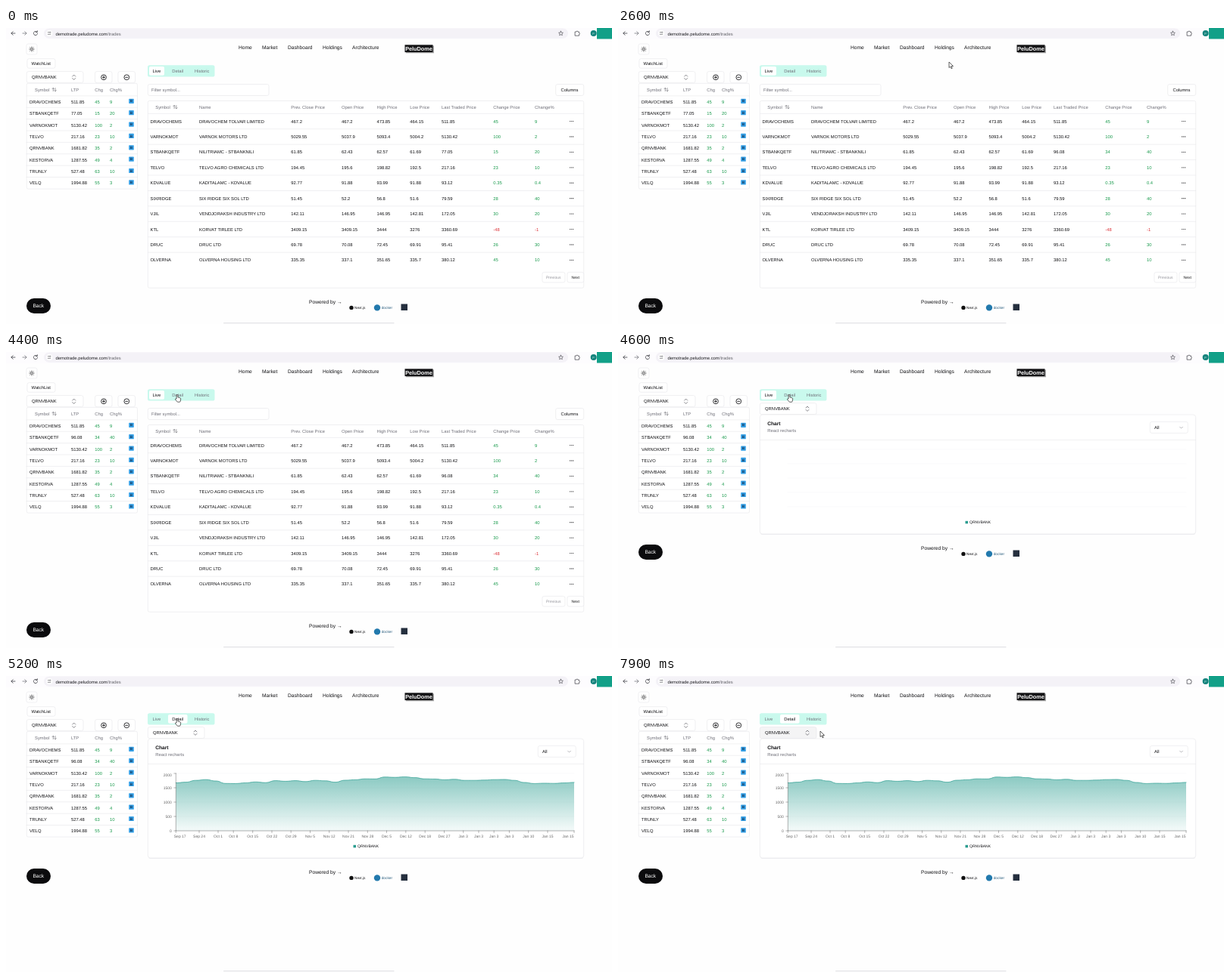
An HTML page that plays this animation: 800 px wide and 392 px high, repeating every 8 s.

```html
<!DOCTYPE html>
<html lang="en">
<head>
<meta charset="utf-8">
<title>Trades</title>
<style>
  html, body { margin: 0; width: 100%; height: 100%; overflow: hidden; background: #fefefe; }
  svg { display: block; width: 800px; height: 392px; }
  text { font-family: "Liberation Sans", Arial, sans-serif; text-rendering: geometricPrecision; white-space: pre; }
</style>
</head>
<body>
<script>
const INK = '#111114', GREY = '#6f6f78', LINE = '#e6e6ea', GREEN = '#16994a', RED = '#dc2f35', TEAL = '#2a9d90';
const SM = 5, MD = 5.83, LG = 6.67;

// cy is the middle of the capitals
const text = (x, cy, s, size = MD, fill = INK, more = '') =>
  `<text x="${x}" y="${(cy + size * 0.358).toFixed(2)}" font-size="${size}" fill="${fill}" ${more}>${s}</text>`;
const box = (x, y, w, h, r = 2.4, fill = '#fff', stroke = LINE, more = '') =>
  `<rect x="${x}" y="${y}" width="${w}" height="${h}" rx="${r}" fill="${fill}" stroke="${stroke}" stroke-width=".6" ${more}/>`;
const path = (d, stroke = INK, w = 0.7, more = '') =>
  `<path d="${d}" fill="none" stroke="${stroke}" stroke-width="${w}" stroke-linecap="round" stroke-linejoin="round" ${more}/>`;
const disc = (x, y, r, fill, more = '') => `<circle cx="${x}" cy="${y}" r="${r}" fill="${fill}" ${more}/>`;
const rule = (x1, x2, y, color = LINE) => path(`M${x1} ${y}H${x2}`, color, 0.6);
const group = (id, body, more = '') => `<g id="${id}" ${more}>${body}</g>`;
const chevrons = (x, y) => path(`M${x - 2} ${y - 1.2}l2-2 2 2M${x - 2} ${y + 1.2}l2 2 2-2`, '#55555c');
const sorter = (x, y) => path(`M${x - 1.2} ${y + 2}v-4.2m-1.2 1.2l1.2-1.2 1.2 1.2M${x + 1.6} ${y - 2}v4.2m-1.2-1.2l1.2 1.2 1.2-1.2`, '#55555c', 0.55);
const tone = s => s.startsWith('-') ? RED : GREEN;

function browserBar() {
  return `<rect width="800" height="15" fill="#fdfcfe"/>` +
    box(50, 0.5, 692, 13.3, 6.6, '#f4f2f7', 'none') +
    path('M12 7H7m2.2-2.3L6.9 7l2.3 2.3', '#3c3c42', 0.8) +
    path('M22 7h5m-2.2-2.3L27.100 7l-2.3 2.3', '#77777e', 0.8) +
    path('M41 5.300a2.6 2.6 0 1 0 .6 2.200M41.300 3.700v1.9h-1.900', '#3c3c42', 0.8) +
    disc(57.3, 7, 4, '#fff') +
    path('M55.300 5.700h1.800M58.800 8.300h-3.500', '#44444a', 0.6) +
    disc(58.3, 5.7, 0.7, 'none', 'stroke="#44444a" stroke-width=".5"') +
    text(65.5, 7.4, 'demotrade.peludome.com<tspan fill="#66666c">/trades</tspan>', 5.88, '#1d1d21') +
    path('M732.500 4.200l.9 1.900 2 .2-1.500 1.400.4 2-1.800-1-1.800 1 .4-2-1.500-1.400 2-.2z', '#3c3c42', 0.6) +
    path('M751.500 5h1.600a.9.9 0 0 1 1.800 0h1.600v1.700a.9.9 0 0 1 0 1.800v1.700h-5z', '#3c3c42', 0.7) +
    disc(775.7, 7, 4, '#15837c') + text(775.7, 7.1, 'P', 4, '#d8efed', 'text-anchor="middle"') +
    '<rect x="780" width="20" height="14.500" fill="#12a088"/>';
}

function header() {
  const links = [[307, 'Home'], [338, 'Market'], [372, 'Dashboard'], [418, 'Holdings'], [457, 'Architecture']];
  const rays = [0, 45, 90, 135, 180, 225, 270, 315]
    .map(a => path('M0-2.400v-.8', INK, 0.6, `transform="translate(34 28) rotate(${a})"`)).join('');
  return links.map(([x, s]) => text(x, 25.6, s, LG)).join('') +
    '<rect x="528" y="23.500" width="37" height="9.800" fill="#aaa"/><rect x="526.500" y="22.300" width="37" height="9.800" fill="#141416"/>' +
    text(545, 27.3, 'PeluDome', 7.3, '#fff', 'font-weight="700" text-anchor="middle"') +
    box(27, 21, 14, 14) + disc(34, 28, 1.4, 'none', `stroke="${INK}" stroke-width=".6"`) + rays;
}

function watchlist() {
  const rows = [
    ['DRAVOCHEMS', '511.85', '45', '9'], ['STBANKQETF', '77.05', '15', '20'],
    ['VARNOKMOT', '5130.42', '100', '2'], ['TELVO', '217.16', '23', '10'],
    ['QRNVBANK', '1681.82', '35', '2'], ['KESTORVA', '1287.55', '49', '4'],
    ['TRUNLY', '527.48', '63', '10'], ['VELQ', '1994.88', '55', '3']];
  const sign = x => disc(x, 65.3, 3.4, 'none', `stroke="${INK}" stroke-width=".85"`) + path(`M${x - 1.6} 65.300h3.200`, INK, 0.85);
  const cells = ([name, ltp, chg, pct], i) => {
    const y = 97.7 + i * 15.37;
    return (i ? rule(27, 173.5, y - 7.8) : '') + text(31, y, name) +
      text(86, y, ltp, MD, INK, 'class="w' + i + '"') +
      text(117.3, y, chg, MD, GREEN, 'class="w' + i + '"') +
      text(137, y, pct, MD, GREEN, 'class="w' + i + '"') +
      box(162.2, y - 4, 6.6, 6.2, 0.6, '#36a0e6', 'none') +
      text(165.5, y - 0.9, 'B', 4.7, '#12385c', 'text-anchor="middle" font-weight="700"');
  };
  return box(28, 40.7, 37, 12.5) + text(33.6, 47, 'WatchList') +
    box(27.3, 57.6, 74.7, 15) + text(34, 65.3, 'QRNVBANK') + chevrons(89.7, 65.3) +
    box(117.5, 57.6, 22.5, 15) + box(148, 57.6, 22.5, 15) + sign(129) + path('M129 63.700v3.200', INK, 0.85) + sign(159.3) +
    box(27.3, 73.3, 146.2, 139.8, 2) +
    text(38, 81.6, 'Symbol', MD, GREY) + sorter(63.5, 81.6) + text(86, 81.6, 'LTP', MD, GREY) +
    text(117.3, 81.6, 'Chg', MD, GREY) + text(137, 81.6, 'Chg%', MD, GREY) +
    rule(27, 173.5, 89.9) + rows.map(cells).join('');
}

function tabs() {
  return box(187, 49.2, 88.5, 15.4, 2.6, '#c9f9ed', 'none') +
    '<rect id="pill" y="51" height="11.800" rx="1.800" fill="#fff"/>' +
    text(193.5, 57, 'Live', MD, INK, 'id="tabLive"') + text(219.3, 57, 'Detail', MD, GREY, 'id="tabDetail"') +
    text(249, 57, 'Historic', MD, GREY);
}

function livePage() {
  const cols = [190.5, 255, 376.3, 443, 489.5, 533.3, 575, 643.3, 698];
  const heads = ['', 'Name', 'Prev. Close Price', 'Open Price', 'High Price', 'Low Price', 'Last Traded Price', 'Change Price', 'Change%'];
  const rows = [
    'DRAVOCHEMS|DRAVOCHEM TOLVAR LIMITED|467.2|467.2|473.85|464.15|511.85|45|9',
    'VARNOKMOT|VARNOK MOTORS LTD|5029.55|5037.9|5093.4|5004.2|5130.42|100|2',
    'STBANKQETF|NILITRIAMC - STBANKNILI|61.85|62.43|62.57|61.69|77.05|15|20',
    'TELVO|TELVO AGRO CHEMICALS LTD|194.45|195.6|198.82|192.5|217.16|23|10',
    'KDVALUE|KADITALAMC - KDVALUE|92.77|91.88|93.99|91.88|93.12|0.35|0.4',
    'SIXRIDGE|SIX RIDGE SIX SOL LTD|51.45|52.2|56.8|51.6|79.59|28|40',
    'VJIL|VENDJORAKSH INDUSTRY LTD|142.11|146.95|146.95|142.81|172.05|30|20',
    'KTL|KORVAT TIRLEE LTD|3409.15|3409.15|3444|3276|3360.69|-48|-1',
    'DRUC|DRUC LTD|69.78|70.08|72.45|69.91|95.41|26|30',
    'OLVERNA|OLVERNA HOUSING LTD|335.35|337.1|351.65|335.7|380.12|45|10'];
  const cells = (row, i) => {
    const y = 123.5 + i * 20.43;
    return (i ? rule(187.5, 762.7, y - 10.2) : '') +
      row.split('|').map((s, c) => text(cols[c], y, s, MD, c > 6 ? tone(s) : INK, c > 5 ? `class="l${i}"` : '')).join('') +
      [744.7, 746.7, 748.7].map(x => disc(x, y, 0.6, INK)).join('');
  };
  return box(187.3, 74.5, 159.7, 15) + text(192, 82, 'Filter symbol...', MD, GREY) +
    box(725.7, 74.5, 37, 15) + text(732.5, 82, 'Columns') +
    box(187.3, 96.5, 575.4, 247.7, 2) +
    text(197.3, 104.6, 'Symbol', MD, GREY) + sorter(223.3, 104.6) +
    heads.map((s, c) => text(cols[c], 104.6, s, MD, GREY)).join('') +
    rule(187.5, 762.7, 113.3) + rows.map(cells).join('') +
    box(708, 323.4, 30, 13.6) + text(713, 330.2, 'Previous', SM, '#909098') +
    box(741, 323.4, 21.7, 13.6) + text(746.6, 330.2, 'Next', SM);
}

function chart() {
  const left = 224.3, right = 750, base = 205, top = 129;
  const ys = [141.5, 140.6, 138.2, 137.2, 139, 142.3, 142.4, 141.5, 140.3, 141.2, 138.6, 139.4, 138.6, 139.8,
    138.2, 138.8, 140.6, 138, 137.4, 136.2, 136.3, 133.8, 134.2, 133.6, 134.6, 136.2, 136.4, 137.4, 136.8, 138.2,
    138.2, 137.8, 137.2, 137, 138.2, 141, 142.4, 142, 142.2, 141.6, 140.9];
  const step = (right - left) / (ys.length - 1);
  const curve = ys.map((y, i) => {
    const x = left + i * step, mid = x - step / 2;
    return i ? `C${mid} ${ys[i - 1]} ${mid} ${y} ${x} ${y}` : `M${x} ${y}`;
  }).join('');
  const days = [[229.7, 'Sep 17'], [255, 'Sep 24'], [280, 'Oct 1'], [300.2, 'Oct 8'], [325.7, 'Oct 15'], [351, 'Oct 22'],
    [376.2, 'Oct 29'], [401.5, 'Nov 5'], [426.7, 'Nov 12'], [452, 'Nov 21'], [477.3, 'Nov 28'], [502.5, 'Dec 5'],
    [527.8, 'Dec 12'], [553.2, 'Dec 18'], [578.5, 'Dec 27'], [603.7, 'Jan 3'], [624, 'Jan 3'], [644.2, 'Jan 3'],
    [664.4, 'Jan 3'], [689.7, 'Jan 10'], [715, 'Jan 15'], [742, 'Jan 15']];
  const dayTick = ([x, s], i) => {
    const at = i ? (i < days.length - 1 ? x : right) : left;
    return path(`M${at} ${base}v2.500`, '#666', 0.5) + text(x, 212.2, s, SM, '#666', 'text-anchor="middle"');
  };
  const levels = [0, 500, 1000, 1500, 2000].map(v => {
    const y = base - (base - top) * v / 2000;
    return path(`M${left} ${y}h-2.500`, '#666', 0.5) + text(218.9, Math.max(y, 131.7), v, SM, '#666', 'text-anchor="end"');
  }).join('');
  return `<path d="${curve}V${base}H${left}Z" fill="url(#fade)"/>` + path(curve, TEAL, 0.7) +
    path(`M${left} ${top}V${base}H${right}`, '#666', 0.5) + levels + days.map(dayTick).join('');
}

function detailPage() {
  const grid = [129, 148, 167, 186, 205].map(y => rule(224.3, 750, y, '#f6f6f8')).join('');
  return box(187.3, 67.6, 74.7, 15, 2.4, '#fff', LINE, 'id="picker"') + text(194, 75.2, 'QRNVBANK') + chevrons(250, 75.2) +
    box(187.6, 84, 575, 158, 3.6, '#eeeef1', 'none') + box(187.3, 83, 575.4, 158, 3.6) +
    text(197.2, 94.6, 'Chart', LG, INK, 'font-weight="700"') + text(197.2, 104, 'React recharts', MD, GREY) +
    rule(187.5, 762.5, 116.5) +
    box(702.3, 92.4, 50, 15) + text(708, 100, 'All') + path('M741.700 99.200l1.900 1.900 1.900-1.900', '#8a8a90', 0.6) +
    grid + group('chart', chart()) +
    `<rect x="458.500" y="223.800" width="3.500" height="3.500" fill="${TEAL}"/>` + text(464, 225.5, 'QRNVBANK', SM);
}

function footer() {
  return box(27, 358, 32, 20, 10, '#0b0b0d', 'none') + text(35.4, 368, 'Back', LG, '#fff') +
    text(400, 363, 'Powered by →', LG) +
    disc(456, 370.4, 2.7, '#111') + text(460, 370.5, 'Next.js', 4.7) +
    disc(490, 370.4, 4.2, '#2279ad') + text(495.700, 370.4, 'docker', 4.8, '#2c5f7f') +
    '<rect x="521.500" y="365.500" width="8.500" height="8.500" fill="#252f3e"/>';
}

const arrow = 'M0 0V7.600L1.800 6l1.200 2.800 1.300-.6L3.100 5.500h2.400z';
const hand = 'M-.9 5V.4a.9.9 0 0 1 1.800 0V3l2.900.8q1 .3.9 1.400L4.200 8.200q-.2 1-.9 1H.4L-2.400 6q-.3-1.100.6-1.100z';
const pointer = (id, d) => `<path id="${id}" d="${d}" fill="#fff" stroke="#222" stroke-width=".7" stroke-linejoin="round"/>`;

document.body.innerHTML = `<svg viewBox="0 0 800 392">
  <defs><linearGradient id="fade" x1="0" y1="0" x2="0" y2="1">
    <stop offset=".05" stop-color="${TEAL}" stop-opacity=".52"/><stop offset=".95" stop-color="${TEAL}" stop-opacity=".07"/>
  </linearGradient></defs>` +
  browserBar() + header() + watchlist() + tabs() +
  group('live', livePage()) + group('detail', detailPage()) + group('foot', footer()) +
  path('M287.500 390.800H512', '#d9d9dd', 0.9) +
  group('cursor', pointer('arrow', arrow) + pointer('hand', hand)) + '</svg>';

const $ = id => document.getElementById(id);
const show = (el, on) => el.setAttribute('display', on ? 'inline' : 'none');
const fillCells = (cls, values) =>
  document.querySelectorAll('.' + cls).forEach((el, i) => { el.textContent = values[i]; });
const OLD = ['77.05', '15', '20'], NEW = ['96.08', '34', '40'];

// time, x, y
const route = [
  [2100, 520, 272], [2300, 486, 160], [2600, 437, 45], [2800, 270, 56], [3000, 266, 59], [3400, 246, 62],
  [3800, 226, 57], [7200, 226, 57], [7300, 222, 76], [7400, 214, 112], [7600, 212, 140], [7700, 225, 108],
  [7800, 246, 79], [7900, 267, 73]];

function place(t) {
  const i = route.findIndex(p => p[0] > t);
  if (i < 0) return route[route.length - 1].slice(1);
  if (!i) return null;
  const [t0, x0, y0] = route[i - 1], [t1, x1, y1] = route[i], k = (t - t0) / (t1 - t0);
  return [x0 + (x1 - x0) * k, y0 + (y1 - y0) * k];
}

function draw(now) {
  const t = Math.floor(now % 8000 / 100) * 100;
  const detail = t >= 4600, ready = t >= 4700;
  show($('live'), !detail);
  show($('detail'), detail);
  show($('chart'), ready);
  $('foot').setAttribute('transform', `translate(0 ${detail ? -103 : 0})`);
  $('pill').setAttribute('x', ready ? 214 : 189);
  $('pill').setAttribute('width', ready ? 25.5 : 20);
  $('tabLive').setAttribute('fill', ready ? GREY : INK);
  $('tabDetail').setAttribute('fill', ready ? INK : GREY);
  fillCells('l2', t >= 2100 ? NEW : OLD);
  fillCells('w1', t >= 4100 ? NEW : OLD);

  const at = place(t);
  show($('cursor'), at);
  if (at) {
    const [x, y] = at;
    const onTabs = x > 188 && x < 275 && y > 49 && y < 65;
    const onPicker = detail && x > 187 && x < 262 && y > 67 && y < 83;
    $('cursor').setAttribute('transform', `translate(${x} ${y})`);
    show($('hand'), onTabs || onPicker);
    show($('arrow'), !onTabs && !onPicker);
    $('picker').setAttribute('fill', onPicker || t >= 7900 ? '#f4f4f5' : '#fff');
  }
}

function tick() {
  draw(performance.now());
  requestAnimationFrame(tick);
}
tick();
</script>
</body>
</html>
```
